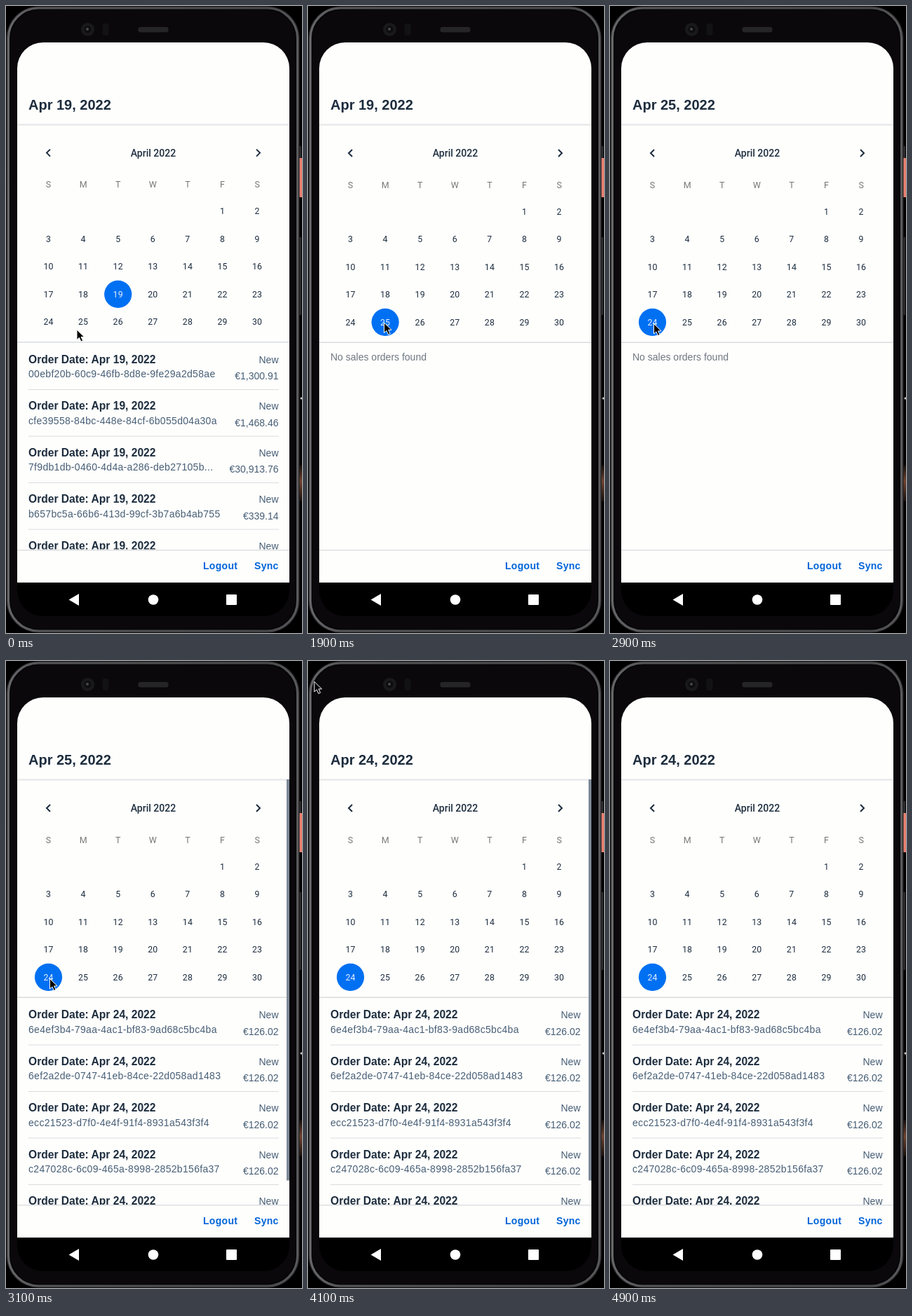
An HTML page that plays this animation: 422x895 px, repeating every 5200 ms.

```html
<!DOCTYPE html>
<html lang="en">
<head>
<meta charset="utf-8">
<title>Order calendar</title>
<style>
  html, body { margin: 0; width: 100%; height: 100%; overflow: hidden; background: #000; }
  svg { display: block; width: 100%; height: 100%; }
  text { font-family: "Liberation Sans", Arial, sans-serif; font-size: 14px; fill: #475e75; white-space: pre; }
  .title { font-size: 20px; font-weight: 700; fill: #1d2d3e; }
  .order { font-size: 15.6px; font-weight: 700; fill: #1d2d3e; }
  .id { letter-spacing: .31px; }
  .end { text-anchor: end; }
  .empty { fill: #6f7680; }
  .action { font-weight: 700; fill: #0064d9; letter-spacing: .3px; }
  .month, .weekday, .day { font-family: Roboto, sans-serif; text-anchor: middle; fill: #1d2d3e; }
  .month { font-weight: 500; }
  .weekday { font-size: 12.5px; fill: #777; }
  .day { font-size: 12.3px; letter-spacing: .2px; }
  .day.picked { fill: #e6f1ff; }
</style>
</head>
<body>
<svg viewBox="0 0 422 895" preserveAspectRatio="none">
  <defs>
    <linearGradient id="rim" x2="1" y2="0">
      <stop offset="0" stop-color="#68686b"/>
      <stop offset=".1" stop-color="#555558"/>
      <stop offset=".9" stop-color="#48484b"/>
      <stop offset="1" stop-color="#5a5a5d"/>
    </linearGradient>
    <linearGradient id="glow" x2="0" y2="1">
      <stop offset="0" stop-color="#100a08"/>
      <stop offset=".45" stop-color="#70432f"/>
      <stop offset="1" stop-color="#150d0a"/>
    </linearGradient>
    <clipPath id="listArea"><rect x="16" y="481" width="388" height="295"/></clipPath>
  </defs>

  <!-- phone body -->
  <rect width="422" height="895"/>
  <rect x="417" y="200" width="4" height="17" fill="#2b2b2e"/>
  <rect x="417" y="217" width="5" height="56" fill="#e9806f"/>
  <rect x="417" y="330" width="4" height="111" fill="#29292c"/>
  <circle cx="421" cy="560" r="1.5" fill="#ccc"/>
  <rect x="418" y="655" width="4" height="52" fill="url(#glow)"/>
  <rect x=".5" y=".5" width="418" height="894" rx="46" fill="#2a2a2c"/>
  <rect x="3.500" y="3" width="412" height="889" rx="43" fill="#060608" stroke="url(#rim)" stroke-width="3"/>
  <rect x="7" y="6.500" width="405" height="882" rx="40" fill="#0a080b"/>
  <circle cx="116.500" cy="33.500" r="9.500" fill="#19191b"/>
  <circle cx="116.500" cy="33.500" r="5" fill="#0d0d10"/>
  <circle cx="116" cy="33" r="2" fill="#48484c"/>
  <rect x="137.500" y="25" width="9" height="17" rx="3" fill="#121215"/>
  <rect x="188.500" y="30" width="43" height="7.500" rx="3" fill="#252528"/>

  <!-- screen -->
  <path d="M16 823V89A37 37 0 0 1 53 52H367A37 37 0 0 1 404 89V823Z" fill="#fefefd"/>
  <path d="M16 823H404V834A37 37 0 0 1 367 871H53A37 37 0 0 1 16 834Z" fill="#000"/>
  <text id="title" class="title" x="32" y="148"></text>
  <rect x="16" y="168.500" width="388" height="2" fill="#e4e5e6"/>

  <g id="content">
    <path d="M63 205l-5 5 5 5M357 205l5 5-5 5" fill="none" stroke="#1d2d3e" stroke-width="2"/>
    <text class="month" x="210" y="215">April 2022</text>
    <circle id="dot" r="19.600" fill="#0070f2"/>
    <g id="days"></g>
    <rect x="16" y="479.500" width="388" height="1.500" fill="#d9dcdf"/>
  </g>
  <g id="list" clip-path="url(#listArea)">
    <g id="orders19"></g>
    <g id="orders24"></g>
    <text id="empty" class="empty" x="32" y="505.500">No sales orders found</text>
  </g>
  <rect id="scrollbar" x="400" y="169" width="4" height="572.500" fill="#7c8997"/>

  <rect x="16" y="776" width="388" height="1.500" fill="#dedfe1"/>
  <text class="action" x="281" y="804">Logout</text>
  <text class="action" x="354" y="804">Sync</text>
  <g fill="#fff">
    <path d="M89.500 847.500L104 839V856Z"/>
    <circle cx="210" cy="847.500" r="7.300"/>
    <rect x="314" y="840" width="15" height="15" rx="1"/>
  </g>
  <path id="cursor" d="M0 0V14.500L3.400 11.400L6 17L8.600 15.800L6.100 10.400H10.600Z" fill="#000" stroke="#fff"/>
</svg>

<script>
const LOOP = 5200, STEP = 200;
const $ = id => document.getElementById(id);
const column = i => 60.5 + 49.6 * i;
const row = i => 293.3 + 39.5 * i;

function addText(parent, className, x, y, content) {
  const node = document.createElementNS("http://www.w3.org/2000/svg", "text");
  node.setAttribute("class", className);
  node.setAttribute("x", x);
  node.setAttribute("y", y);
  node.textContent = content;
  parent.append(node);
  return node;
}

[..."SMTWTFS"].forEach((name, i) => addText($("days"), "weekday", column(i), 259.7, name));

// April 2022 starts on a Friday.
const days = Array.from({ length: 30 }, (_, i) => {
  const cell = i + 5;
  const x = column(cell % 7), y = row(Math.floor(cell / 7));
  return { x, y, label: addText($("days"), "day", x, y + 4.3, i + 1) };
});

function addOrders(date, orders) {
  const group = $("orders" + date);
  orders.forEach(([id, price], i) => {
    const y = 66.5 * i;
    addText(group, "order", 32, 510 + y, `Order Date: Apr ${date}, 2022`);
    addText(group, "end", 388.5, 510 + y, "New");
    addText(group, "id", 32, 530.5 + y, id);
    addText(group, "end", 388.5, 533.5 + y, price);
    const line = document.createElementNS("http://www.w3.org/2000/svg", "path");
    line.setAttribute("d", `M32 ${548 + y}H389`);
    line.setAttribute("stroke", "#d9dcdf");
    group.append(line);
  });
}

addOrders(19, [
  ["00ebf20b-60c9-46fb-8d8e-9fe29a2d58ae", "€1,300.91"],
  ["cfe39558-84bc-448e-84cf-6b055d04a30a", "€1,468.46"],
  ["7f9db1db-0460-4d4a-a286-deb27105b...", "€30,913.76"],
  ["b657bc5a-66b6-413d-99cf-3b7a6b4ab755", "€339.14"],
  ["", ""]
]);
addOrders(24, [
  ["6e4ef3b4-79aa-4ac1-bf83-9ad68c5bc4ba", "€126.02"],
  ["6ef2a2de-0747-41eb-84ce-22d058ad1483", "€126.02"],
  ["ecc21523-d7f0-4e4f-91f4-8931a543f3f4", "€126.02"],
  ["c247028c-6c09-465a-8998-2852b156fa37", "€126.02"],
  ["", ""]
]);

// Each entry: time, x, y
const cursorPath = [
  [0, 101, 462], [500, 109, 458], [900, 117, 454.5], [1300, 108.5, 452], [2300, 108.5, 452],
  [2700, 62.5, 453.5], [3500, 62.5, 453.5], [4100, 9, 29.5], [LOOP, 9, 29.5]
];

function cursorAt(time) {
  const next = cursorPath.findIndex(key => key[0] > time);
  const [t0, x0, y0] = cursorPath[next - 1], [t1, x1, y1] = cursorPath[next];
  const p = (time - t0) / (t1 - t0);
  return [x0 + (x1 - x0) * p, y0 + (y1 - y0) * p];
}

const show = (id, visible) => $(id).setAttribute("visibility", visible ? "visible" : "hidden");

function render(elapsed) {
  const now = elapsed % LOOP;
  const time = Math.min(4900, Math.max(0, Math.floor((now + 100) / STEP) * STEP - 100));
  const picked = time < 1500 ? 19 : time < 2700 ? 25 : 24;
  const titleDay = time < 2500 ? 19 : time < 3700 ? 25 : 24;

  $("title").textContent = `Apr ${titleDay}, 2022`;
  days.forEach(({ label }, i) => label.classList.toggle("picked", i + 1 === picked));
  $("dot").setAttribute("cx", days[picked - 1].x);
  $("dot").setAttribute("cy", days[picked - 1].y);

  const shift = `translate(0 ${time < 1300 ? -0.4 : 0})`;
  $("content").setAttribute("transform", shift);
  $("list").setAttribute("transform", shift);
  show("orders19", time < 1700);
  show("empty", time >= 1700 && time < 3100);
  show("orders24", time >= 3100);
  show("scrollbar", time >= 3100 && time < 4900);

  show("cursor", time < 4300);
  $("cursor").setAttribute("transform", `translate(${cursorAt(time)})`);
}

const start = performance.now();
function frame() {
  render(performance.now() - start);
  requestAnimationFrame(frame);
}
frame();
</script>
</body>
</html>
```
